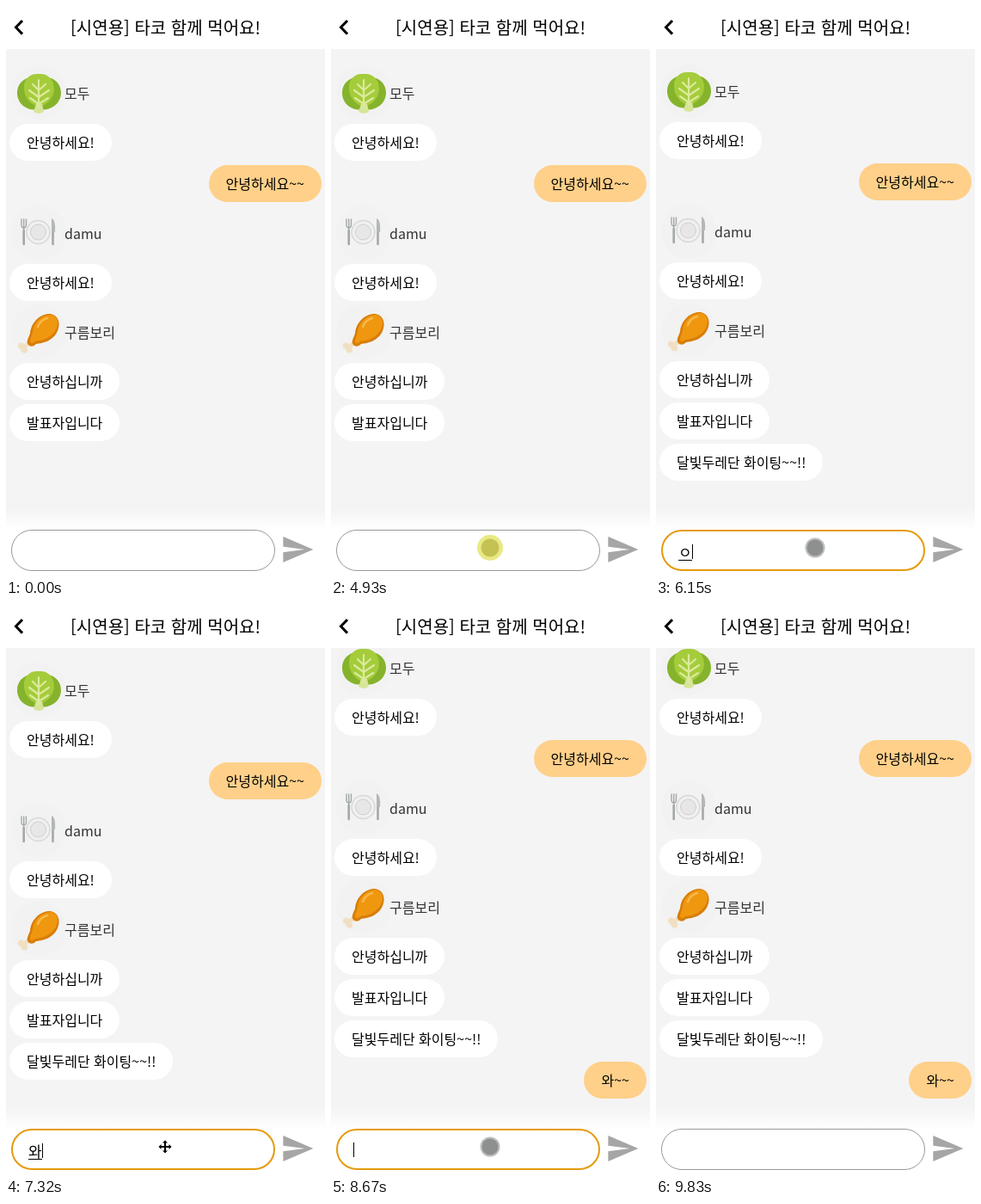
These frames come from a looping animation (371 px wide and 664 px high, 9.92 s). An HTML page:

```html
<!DOCTYPE html>
<html lang="ko">
<head>
<meta charset="utf-8">
<title>채팅방</title>
<style>
html, body { margin: 0; width: 100%; height: 100%; overflow: hidden; }
body { position: relative; background: #f4f4f4; color: #000; font: 500 16px/23px "Noto Sans CJK KR", "Noto Sans KR", sans-serif; }
svg { position: absolute; overflow: visible; }
header { position: absolute; top: 0; left: 0; width: 371px; height: 50px; background: #fff; font-size: 20px; line-height: 49px; text-align: center; }
header svg { left: 0; top: 0; }
footer { position: absolute; top: 584px; left: 0; width: 371px; height: 80px; background: linear-gradient(#fff0, #fff 25px); }
#list { position: absolute; top: 0; left: 0; width: 371px; }
#list > * { position: absolute; white-space: nowrap; }
.msg { left: 4px; padding: 10px 20px; border-radius: 22px; background: #fff; }
.mine { left: auto; right: 4px; background: #ffd08a; }
.user { left: 6px; width: 64px; height: 64px; border-radius: 50%; background: #f2f2f2; }
.user b { position: absolute; left: 62px; top: 21px; font-weight: 400; color: #333; }
.user svg { left: 0; top: 0; }
#field { position: absolute; left: 6px; top: 25px; width: 307px; height: 48px; box-sizing: border-box; border: 1px solid #999; border-radius: 24px; background: #fff; }
#field.focus { border: 2px solid #e59a0c; }
#entry { position: absolute; left: 26px; top: 41px; height: 18px; display: flex; font-size: 17px; line-height: 18px; font-weight: 400; }
#text.composing { box-shadow: 0 1px #000; }
#caret { width: 1px; height: 17px; background: #000; }
#send { left: 318.6px; top: 28px; }
#pointer { left: 0; top: 0; }
</style>
</head>
<body>
<div id="list">
  <div class="user" style="top:69px">
    <svg width="64" height="64" fill="none" stroke-linecap="round">
      <path fill="#86b32c" d="M30 17C20 10 7 19 7 32C7 45 19 54 32 51C45 54 58 45 58 32C58 19 45 10 35 17Z"/>
      <path fill="#a4cc3b" d="M32 10C21 9 14 17 15 27C15 38 23 45 32 49C42 45 50 38 50 27C50 17 43 9 32 10Z"/>
      <path fill="#d7e59a" d="M29 45H36L38 54Q32 58 26 54Z"/>
      <path stroke="#dcea9c" stroke-width="2.2" d="M32 17V49M32 29L25 22M32 29L40 22M32 37L21 29M32 37L44 29M32 45L22 38M32 45L43 38"/>
    </svg><b>모두</b>
  </div>
  <div class="msg" style="top:137px">안녕하세요!</div>
  <div class="msg mine" style="top:185px">안녕하세요~~</div>
  <div class="user" style="top:232px">
    <svg width="64" height="64" fill="none" stroke-linecap="round">
      <circle cx="31.5" cy="31" r="13.5" fill="#f0f0f0" stroke="#d8d8d8" stroke-width="1.5"/>
      <circle cx="31.5" cy="31" r="9" fill="#e7e7e7" stroke="#cfcfcf"/>
      <path stroke="#a3a8aa" stroke-width="1.4" d="M12 16V22Q12 26 14.7 26Q17.5 26 17.5 22V16M14.7 16V28"/>
      <path stroke="#a3a8aa" stroke-width="2.6" d="M14.7 29V45M48.5 30V45"/>
      <path fill="#b2b7b9" d="M47 31V15Q52 17 51 31Z"/>
    </svg><b>damu</b>
  </div>
  <div class="msg" style="top:300px">안녕하세요!</div>
  <div class="user" style="top:347px">
    <svg width="64" height="64">
      <path fill="none" stroke="#f1dfc3" stroke-width="5" stroke-linecap="round" d="M22 44L13 51"/>
      <g fill="#f1dfc3"><circle cx="11.5" cy="48" r="3.6"/><circle cx="15.5" cy="53" r="3.6"/></g>
      <path fill="#d87d08" d="M20 47C17 44 20 39 22 34C23 20 35 10 46 11C56 13 58 24 53 33C47 43 37 45 29 46C25 50 22 49 20 47Z"/>
      <path fill="#ef970f" d="M22 43C22 40 24 37 25 32C26 21 36 12 46 12C55 14 56 23 51 31C45 40 36 42 28 43C25 46 23 46 22 43Z"/>
      <path fill="none" stroke="#f8b84a" stroke-width="2.5" stroke-linecap="round" d="M31 26Q34 18 42 16"/>
    </svg><b>구름보리</b>
  </div>
  <div class="msg" style="top:415px">안녕하십니까</div>
  <div class="msg" style="top:463px">발표자입니다</div>
  <div class="msg" id="cheer" style="top:511px">달빛두레단 화이팅~~!!</div>
  <div class="msg mine" id="reply" style="top:559px">와~~</div>
</div>

<header>
  <svg width="30" height="50"><path d="M19 17L11.5 24.8L19 32.6" fill="none" stroke="#000" stroke-width="3"/></svg>
  [시연용] 타코 함께 먹어요!
</header>

<footer>
  <div id="field"></div>
  <div id="entry"><span id="text"></span><i id="caret"></i></div>
  <svg id="send" width="40" height="40" viewBox="0 0 24 24"><path fill="#a6a6a6" d="M2 21L23 12L2 3V10L17 12L2 14Z"/></svg>
</footer>

<svg id="pointer" width="371" height="664">
  <g id="dot"><circle r="11.5" fill="#bcbdbd"/><circle r="9.5" fill="#8e8f8f"/></g>
  <g id="press"><circle r="15" fill="#e9e985"/><circle r="10.5" fill="#c5c254"/></g>
  <g id="cross">
    <path id="arrows" d="M0 -7.5L3 -4.5H1V-1H4.5V-3L7.5 0L4.5 3V1H1V4.5H3L0 7.5L-3 4.5H-1V1H-4.5V3L-7.5 0L-4.5 -3V-1H-1V-4.5H-3Z" stroke="#fff" paint-order="stroke"/>
  </g>
</svg>

<script>
const LOOP = 9920;
const $ = id => document.getElementById(id);

// Each track lists [start time, value]; a value holds until the next one.
const tracks = {
  scroll: [[0, 0], [5210, 2], [8260, 7], [8300, 16], [8340, 24], [8380, 28]],
  text: [[0, ''], [6150, 'ㅇ'], [7020, '오'], [7320, '와'], [7530, '와~'], [7680, '와~~'], [7820, '']],
  caret: [[0, 0], [5040, 1], [5570, 0], [6070, 1], [6650, 0], [7020, 1], [8340, 0], [8670, 1], [9200, 0], [9710, 1], [9830, 0]],
  pointer: [[0, ''], [4410, 'dot'], [4930, 'press'], [5180, 'dot'], [7100, 'cross'], [7820, 'dot'], [9200, '']],
  pointerY: [[0, 656], [4450, 647], [4490, 639], [4530, 633], [4570, 630], [9040, 633], [9080, 639], [9120, 647], [9160, 656]]
};

const valueAt = (name, t) => tracks[name].findLast(([start]) => start <= t)[1];
const show = (id, on) => { $(id).style.visibility = on ? 'visible' : 'hidden'; };

function draw(t) {
  const text = valueAt('text', t);
  const pointer = valueAt('pointer', t);
  $('list').style.top = -valueAt('scroll', t) + 'px';
  show('cheer', t >= 5180);
  show('reply', t >= 8220);
  $('field').className = t >= 5040 && t < 9830 ? 'focus' : '';
  $('text').textContent = text;
  $('text').className = text.length === 1 ? 'composing' : '';
  $('entry').style.top = (text ? 42 : 41) + 'px';
  show('caret', valueAt('caret', t));
  for (const id of ['dot', 'press', 'cross']) {
    show(id, id === pointer);
    $(id).setAttribute('transform', `translate(185 ${valueAt('pointerY', t)})`);
  }
}

const start = performance.now();
function frame() {
  draw((performance.now() - start) % LOOP);
  requestAnimationFrame(frame);
}
frame();
</script>
</body>
</html>
```
